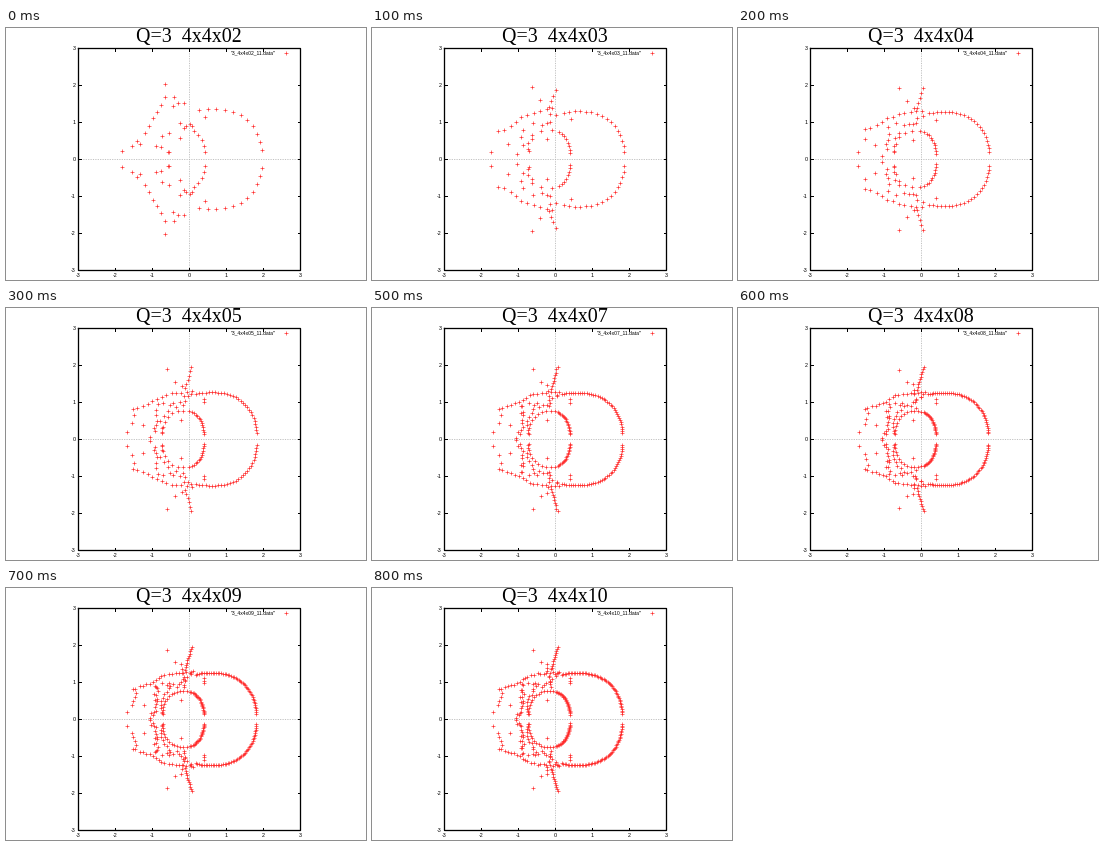
Animation of 360 by 252 pixels, one loop 0.9 s. Source, as a matplotlib script:

```python
import numpy as np
import matplotlib.pyplot as plt
from matplotlib.animation import FuncAnimation

W, H, DPI = 360, 252, 100
PX = 72 / DPI            # one pixel in points
CX, CY, UNIT = 183, 131, 37
RED = "#ff2a2a"
SIZES = range(2, 11)

# Strands of roots in the upper half plane, in pixels from the centre:
# fixed count, count per layer, scatter, guide for thick lattices, guide for thin ones
STRANDS = [
    (5, 1.6, .8, [(-58, 30), (-44, 33), (-25, 44), (6, 47)],
                 [(-56, 10), (-42, 21), (-29, 45), (-20, 61)]),
    (1, 1.1, .3, [(3, 73), (-1, 60), (-4, 48)], [(-2, 50), (-8, 52), (-17, 47)]),
    (1, 1.3, 2, [(-27, 37), (-11, 33), (4, 46)], [(-9, 35), (-1, 31), (6, 33)]),
    (-2, 2, 2, [(-38, 1), (-33, 12), (-32, 35)], [(-31, 9), (-28, 15), (-24, 25)]),
    (0, 1, 1.2, [(-27, 3), (-29, 18), (-20, 31)], [(-21, 6), (-20, 7), (-19, 8)]),
    (-2, 1, 1.2, [(-9, 56), (-5, 42), (-5, 29)], None),
    (-1, .5, .5, [(-57, 12), (-54, 22), (-53, 28)], None),
    (0, .3, .2, [(15, 34), (15, 42)], None),
]
LONE = [(-22, 69), (-14, 56.5), (-61.5, 7), (-45, 14), (-8, 19)]


def spread(path, count):
    """Place count points evenly along a path."""
    dist = np.r_[0, np.cumsum(np.hypot(*np.diff(path, axis=0).T))]
    s = (np.arange(count) + .5) / max(count, 1) * dist[-1]
    return np.column_stack([np.interp(s, dist, path[:, k]) for k in (0, 1)])


def arc(cx, a, b, start, end, count):
    """Points on part of a slightly squared ellipse; angles in degrees."""
    t = np.radians(np.linspace(start, end, 200))
    c, s = np.cos(t), np.sin(t)
    p = 2 / 2.3
    path = np.column_stack([cx + a * np.sign(c) * abs(c)**p, b * abs(s)**p])
    return spread(path, round(count))


def strand(n, seed, base, per_layer, scatter, thick, thin):
    thick = np.array(thick, float)
    thin = thick if thin is None else np.array(thin, float)
    path = thick + (thin - thick) * (2 / n)**4
    pts = spread(path, max(0, round(base + per_layer * n)))
    return pts + scatter * np.random.default_rng(seed).uniform(-1, 1, pts.shape)


def roots(n):
    parts = [arc(22, 45, 46, 4, 108, 5.5 * n),
             arc(-5.5, 20.5, 28, 6, 72, 2.6 * n),
             arc(-5.5, 21.5, 28, 72, 174, 1.5 * n),
             LONE]
    parts += [strand(n, k, *s) for k, s in enumerate(STRANDS)]
    upper = np.vstack(parts) * (1 + .36 / n**2)
    both = np.vstack([upper, upper * (1, -1)])
    return CX + both[:, 0], CY - both[:, 1]


fig = plt.figure(figsize=(W / DPI, H / DPI), dpi=DPI, facecolor="white")
ax = fig.add_axes([0, 0, 1, 1])
ax.set(xlim=(0, W), ylim=(H, 0))
ax.axis("off")


def line(x, y, color="black", width=1.0, **kw):
    return ax.plot(x, y, color=color, lw=width * PX, **kw)[0]


def label(x, y, text, size, font="Liberation Sans", **kw):
    return ax.text(x, y, text, fontsize=size * PX, family=font, va="baseline", **kw)


L, R, T, B = CX - 3 * UNIT, CX + 3 * UNIT, CY - 3 * UNIT, CY + 3 * UNIT
dots = dict(color="#b4b4b4", width=.8, dashes=(1.5, 1.5))
line([L, R], [CY, CY], **dots)
line([CX, CX], [T, B], **dots)
line([L, R, R, L, L], [T, T, B, B, T], width=1.3, solid_joinstyle="miter")
for v in range(-3, 4):
    x, y = CX + v * UNIT, CY - v * UNIT
    for edge, step in ((L, 2.5), (R, -2.5)):
        line([edge, edge + step], [y, y])
    for edge, step in ((T, 2.5), (B, -2.5)):
        line([x, x], [edge, edge + step])
    label(x, 249.3, str(v), 5.4, ha="center")
    label(70, y + 2, str(v), 5.4, ha="right")

plus = dict(ls="none", marker="+", ms=3.6 * PX, mew=.65 * PX, color=RED)
ax.plot([280], [25], **plus)
cloud, = ax.plot([], [], **plus)
title = label(CX, 14, "", 20, "Liberation Serif", ha="center")
key = label(270, 26, "", 5, ha="right")


def draw(i):
    n = SIZES[i]
    cloud.set_data(*roots(n))
    title.set_text(f"Q=3  4x4x{n:02d}")
    key.set_text(f'"3_4x4x{n:02d}_11.data"')
    return cloud, title, key


anim = FuncAnimation(fig, draw, frames=len(SIZES), interval=100,
                     repeat=True, repeat_delay=0, blit=False)
plt.show()
```
